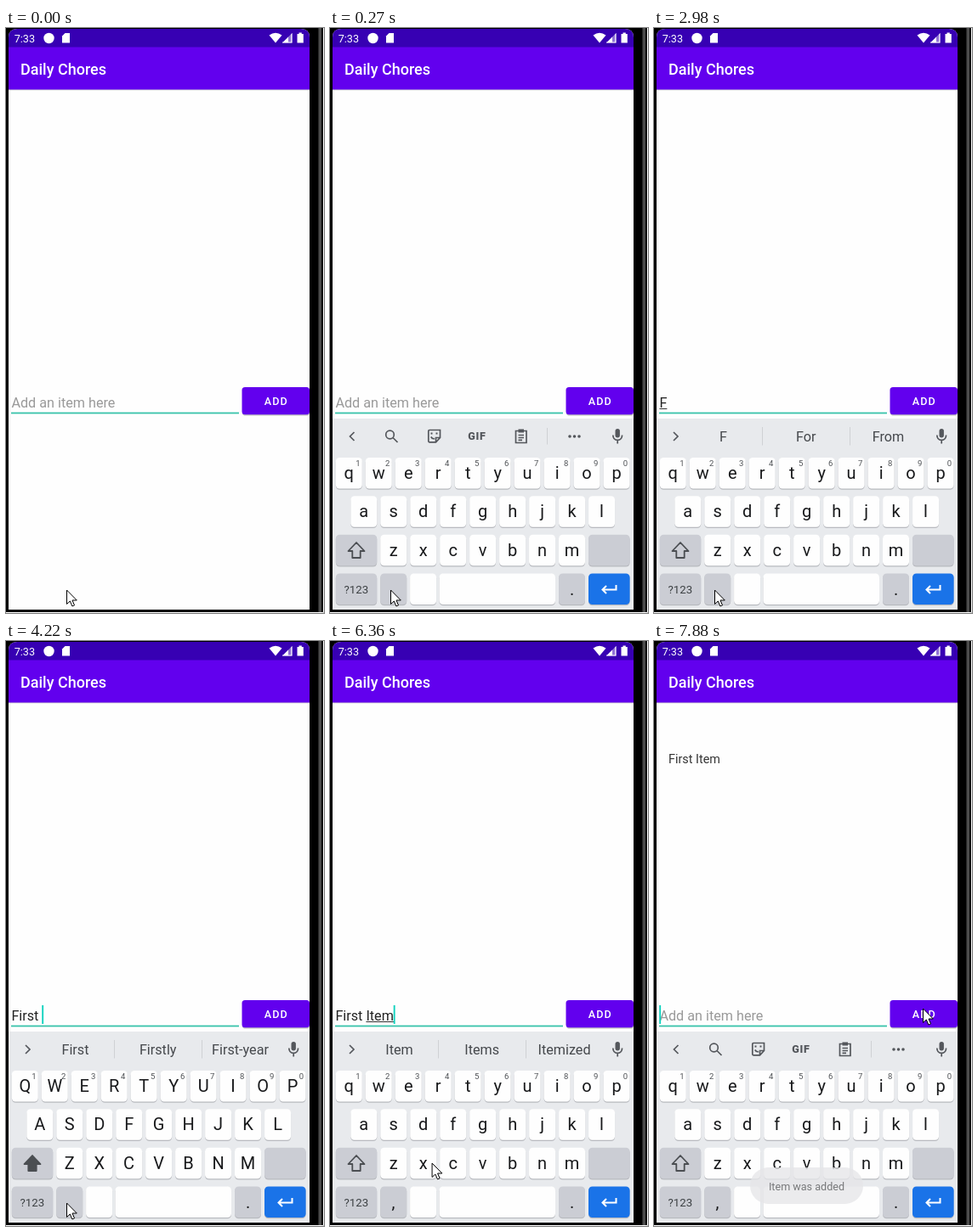
These frames come from a looping animation (374x689 px, 8000 ms). An HTML page:

```html
<!DOCTYPE html>
<html lang="en">
<head>
<meta charset="utf-8">
<title>Daily Chores</title>
<style>
html, body { margin: 0; width: 100%; height: 100%; overflow: hidden; background: #000; }
svg { display: block; width: 100%; height: 100%; }
text { font-family: Roboto, Arial, sans-serif; white-space: pre; }
.mid { text-anchor: middle; }
.medium { font-weight: 500; }
.edit { font-size: 16.2px; }
.key { font-size: 20px; fill: #18191b; }
.num { font-size: 9.5px; fill: #4d5054; }
.sug { font-size: 16.2px; fill: #45484c; }
.line { fill: none; stroke: #54575c; stroke-width: 1.7; }
.solid { fill: #54575c; }
</style>
</head>
<body>
<svg viewBox="0 0 374 689" preserveAspectRatio="none">
  <defs>
    <clipPath id="screen"><path d="M3 685V11Q3 1 13 1H347Q357 1 357 11V685Z"/></clipPath>
    <linearGradient id="shade" x2="0" y2="1"><stop stop-color="#bbb"/><stop offset="1" stop-color="#fff"/></linearGradient>
  </defs>
  <rect width="374" height="689"/>
  <rect x="367.5" width="3.5" height="688" fill="#4c4c4c"/>
  <path d="M373.5 0V688.5H0" fill="none" stroke="#fff"/>

  <g clip-path="url(#screen)">
    <rect width="357" height="689" fill="#fefefe"/>
    <rect y="72" width="357" height="2" fill="url(#shade)"/>
    <rect y="22" width="357" height="50.5" fill="#6200ee"/>
    <rect width="357" height="22.5" fill="#3700b3"/>
    <g fill="#fff">
      <text x="9.7" y="16.8" font-size="12.6">7:33</text>
      <circle cx="50.5" cy="12" r="6.2"/>
      <path d="M69.5 6H75V17.5H66V9.5Z"/>
      <path d="M309.5 8.5Q317 3 324.5 8.5L317 17.5Z"/>
      <path d="M325 17.5L336.5 6V17.5Z" opacity=".45"/>
      <path d="M325 17.5L332 10.5V17.5ZM335.3 7.2L336.5 6V17.5H325V16.4H335.3Z"/>
      <path d="M342.5 7H344.5V5.5H347.8V7H349.8V17.5H342.5Z"/>
      <text x="17" y="55" font-size="18" class="medium">Daily Chores</text>
    </g>
    <text id="item" x="17" y="143.5" font-size="14.4" fill="#333">First Item</text>

    <text id="hint" class="edit" x="6.4" y="446.5" fill="#999">Add an item here</text>
    <text id="typed" class="edit" x="6.4" y="446.5" fill="#222"></text>
    <rect id="under" y="448" height="1" fill="#333"/>
    <rect x="6" y="452.6" width="268" height="1.8" fill="#38c2aa"/>
    <rect id="caret" y="429" width="1.9" height="22" fill="#12d2bf"/>
    <rect x="278" y="424.5" width="79" height="32" rx="3.6" opacity=".25"/>
    <rect id="button" x="277.5" y="423" width="79.5" height="32.3" rx="3.6"/>
    <text class="medium" x="303.7" y="444" font-size="12.6" letter-spacing="1.1" fill="#fff">ADD</text>

    <g id="board">
      <rect y="460" width="357" height="230" fill="#e8eaed"/>
      <g id="tools">
        <path class="line" d="M28.5 476L23.5 481L28.5 486"/>
        <circle class="line" cx="70.5" cy="479" r="4.8"/>
        <path class="line" d="M74 482.5L79.5 488" stroke-width="2"/>
        <path class="line" d="M117 473.5H129.5V482.5L124.5 487.8H117Q115.8 487.8 115.8 486.5V474.8Q115.8 473.5 117 473.5ZM124.5 487.5V482.5H129.5M118.7 481.5Q120.5 484.5 123 483.5"/>
        <path class="solid" d="M118.5 476.5h2v2h-2ZM124.5 476.5h2v2h-2Z"/>
        <text class="mid solid" x="173" y="485" font-size="12.5" font-weight="800" letter-spacing=".8">GIF</text>
        <path class="line" d="M218.5 474.5H231V488.5H218.5ZM221.5 479.5H228M221.5 482.5H228M221.5 485.3H226"/>
        <path class="solid" d="M221.5 472.5H228V476.5H221.5Z"/>
        <path d="M255.5 471V490.5" stroke="#cfd1d4"/>
        <g class="solid"><circle cx="282" cy="481" r="1.8"/><circle cx="287.5" cy="481" r="1.8"/><circle cx="293" cy="481" r="1.8"/></g>
      </g>
      <g id="words">
        <path class="line" d="M23 476L28 481L23 486"/>
        <path d="M127.5 470V491.5M230.5 470V491.5" stroke="#cfd1d4"/>
        <text class="mid sug" x="81.5" y="487"></text>
        <text class="mid sug" x="178.7" y="487"></text>
        <text class="mid sug" x="275.5" y="487"></text>
      </g>
      <rect class="solid" x="335.5" y="472" width="5.4" height="10.5" rx="2.7"/>
      <path class="line" d="M332.8 479.5Q333 485.3 338.2 485.3Q343.4 485.3 343.6 479.5M338.2 485.5V489.5"/>
      <g id="keys"></g>
      <path id="shift" d="M31 606L40.5 616H35.7V624H26.3V616H21.5Z" stroke="#4b4e52" stroke-width="1.8" stroke-linejoin="round"/>
      <text class="mid" x="30.8" y="666" font-size="13.3" fill="#3c4043">?123</text>
      <text class="mid key" x="74.5" y="668" font-size="18">,</text>
      <text class="mid key" x="284.6" y="668" font-size="18">.</text>
      <path d="M336.5 656V661.5H320.5M325 657L320.5 661.5L325 666" fill="none" stroke="#fff" stroke-width="2"/>
    </g>
    <g id="toast">
      <rect x="113" y="620" width="133" height="43" rx="21.5" fill="#e6e6e8" opacity=".78"/>
      <text class="mid" x="179.5" y="647" font-size="12.6" fill="#77787a">Item was added</text>
    </g>
  </g>
  <path id="mouse" d="M0 0V16.5L3.8 13L6.4 19L9 17.9L6.5 12H11.8Z" fill="#fff" stroke="#000"/>
</svg>
<script>
const LOOP = 8000;
const $ = id => document.getElementById(id);
const show = (id, on) => $(id).setAttribute("visibility", on ? "visible" : "hidden");

const box = (x, y, w, fill) =>
  `<rect x="${x}" y="${y + 1.2}" width="${w}" height="36.5" rx="4.5" fill="#b8babf"/>
   <rect x="${x}" y="${y}" width="${w}" height="36.5" rx="4.5" fill="${fill}"/>`;
const GREY = "#cbcdd4", WHITE = "#fefefe", PITCH = 34.97;

function letterRow(letters, x0, y, numbered) {
  return [...letters].map((c, i) => {
    const x = x0 + i * PITCH;
    return box(x, y, 31, WHITE) +
      `<text class="mid key letter" x="${x + 15.5}" y="${y + 25}">${c}</text>` +
      (numbered ? `<text class="mid num" x="${x + 26}" y="${y + 10.3}">${(i + 1) % 10}</text>` : "");
  }).join("");
}

$("keys").innerHTML =
  letterRow("qwertyuiop", 6.8, 506, true) +
  letterRow("asdfghjkl", 24.3, 551.3) +
  letterRow("zxcvbnm", 59.2, 596.8) +
  box(6.8, 596.8, 48.4, GREY) + box(304, 596.8, 48.6, GREY) +
  box(6.8, 642.5, 48.4, GREY) + box(59.2, 642.5, 31, GREY) +
  box(94.1, 642.5, 31, WHITE) + box(128.5, 642.5, 136.5, WHITE) +
  box(269, 642.5, 31, GREY) + box(304, 642.5, 48.6, "#1a73e8");

const letters = [...document.querySelectorAll(".letter")];
const slots = [...document.querySelectorAll(".sug")];
const pen = document.createElement("canvas").getContext("2d");
pen.font = "16.2px Roboto, Arial, sans-serif";
const widthOf = s => pen.measureText(s).width;

// Each step changes only the listed properties; rise is the part of the keyboard in view.
const steps = [
  [0, { rise: 0, caps: false, caret: false, done: "", word: "", sug: "", item: false, toast: false, press: false }],
  [120, { rise: .7 }],
  [270, { rise: 1 }],
  [390, { caret: true }],
  [950, { caret: false }],
  [1350, { caret: true }],
  [1900, { caret: false }],
  [2180, { caps: true }],
  [2380, { caps: false, word: "F", caret: true }],
  [2580, { sug: "F|For|From" }],
  [2980, { caret: false }],
  [3100, { word: "Fi", caret: true }],
  [3380, { word: "Fir", sug: "Fi|First|Find" }],
  [3500, { word: "Firs", sug: "Fir|First|Fire" }],
  [3620, { word: "First" }],
  [3770, { sug: "Firs|First|Fits" }],
  [4070, { sug: "First|Firstly|First-year" }],
  [4220, { done: "First ", word: "", caps: true }],
  [4340, { word: "I", caps: false, sug: "of all|time|day" }],
  [4620, { sug: "I|It|In" }],
  [4900, { word: "It" }],
  [5020, { word: "Ite", sug: "It|It's|Its" }],
  [5140, { sug: "Ite|Item|It's" }],
  [5290, { word: "Item" }],
  [5440, { sug: "Item|Items|Itemized" }],
  [5690, { caret: false }],
  [6260, { caret: true }],
  [6820, { caret: false }],
  [7220, { caret: true }],
  [7490, { press: true }],
  [7610, { press: false, done: "", word: "", item: true }],
  [7760, { sug: "" }],
  [7880, { toast: true }]
];

function mouseAt(t) {
  if (t < 6120) return [71.5, 662];
  if (t >= 7220) return [316.5, 433];
  const n = Math.min(7, Math.floor((t - 6120) / 136.6) + 1) / 7;
  const p = n * n * (3 - 2 * n);
  return [71.5 + 245 * p, 662 - 237 * p];
}

function draw(t) {
  const s = Object.assign({}, ...steps.filter(([at]) => at <= t).map(([, change]) => change));
  const text = s.done + s.word, start = 6.4 + widthOf(s.done);

  $("typed").textContent = text;
  show("hint", !text);
  $("under").setAttribute("x", start);
  $("under").setAttribute("width", widthOf(s.word));
  $("caret").setAttribute("x", 6.2 + widthOf(text));
  show("caret", s.caret);

  show("board", s.rise > 0);
  $("board").setAttribute("transform", `translate(0 ${(1 - s.rise) * 229})`);
  $("tools").style.display = s.sug ? "none" : "";
  $("words").style.display = s.sug ? "" : "none";
  const words = s.sug.split("|");
  slots.forEach((slot, i) => slot.textContent = words[i] || "");
  letters.forEach(k => k.textContent = s.caps ? k.textContent.toUpperCase() : k.textContent.toLowerCase());
  $("shift").setAttribute("fill", s.caps ? "#4b4e52" : "none");

  show("item", s.item);
  show("toast", s.toast);
  $("button").setAttribute("fill", s.press ? "#7a2bf1" : "#6200ee");
  $("mouse").setAttribute("transform", `translate(${mouseAt(t)})`);
}

const origin = performance.now();
function tick() {
  draw((performance.now() - origin) % LOOP);
  requestAnimationFrame(tick);
}
tick();
</script>
</body>
</html>
```
